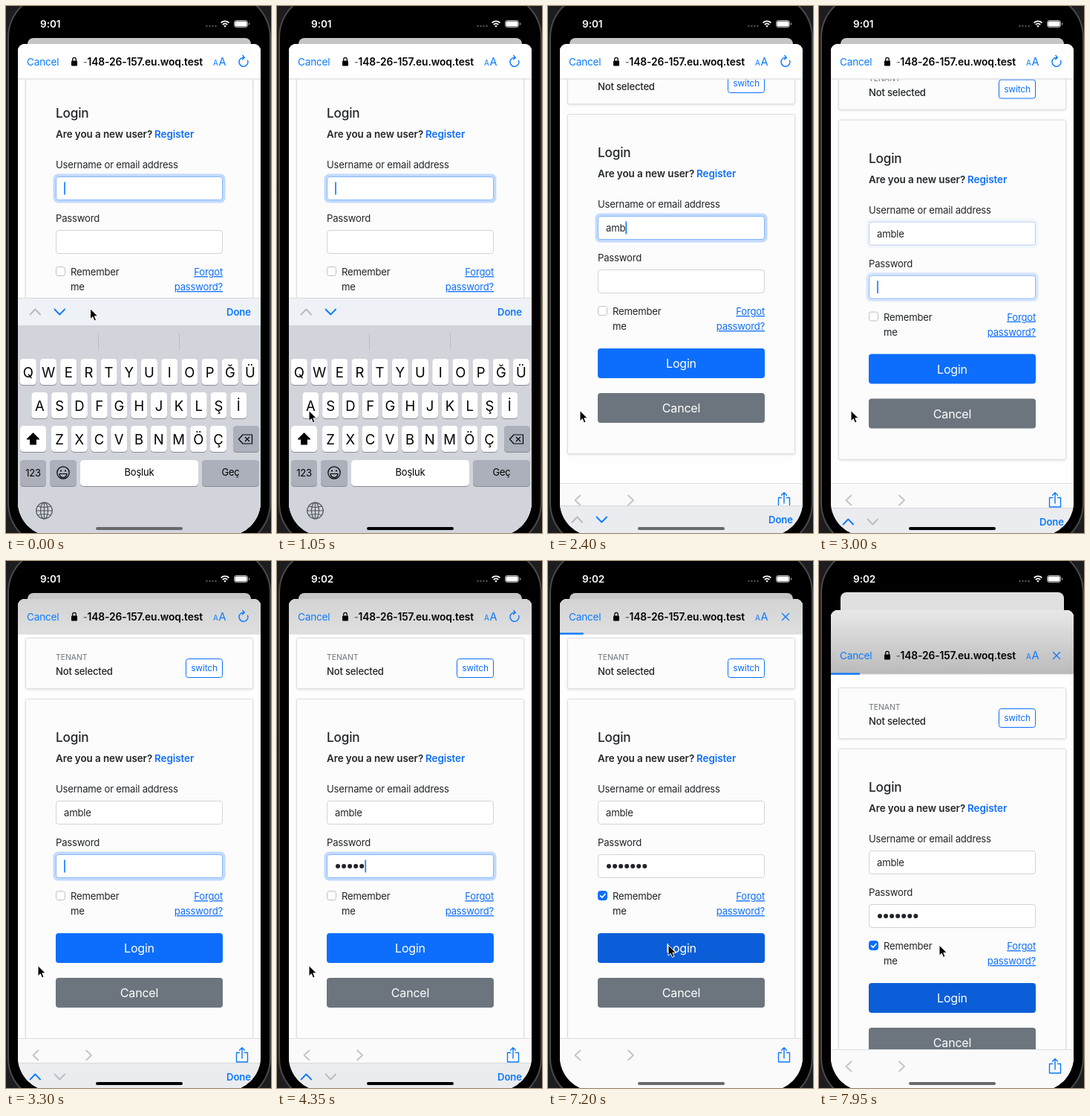
An HTML page for the animation above (8 s loop, 357 px wide and 708 px high).

```html
<!DOCTYPE html>
<html lang="en">
<head>
<meta charset="utf-8">
<title>Login on a phone</title>
<style>
  html, body { margin: 0; width: 100%; height: 100%; overflow: hidden; background: #000; }
  svg { display: block; width: 357px; height: 708px; }
  text { font-family: Inter, "Noto Sans", sans-serif; font-size: 13.1px; letter-spacing: -.2px; fill: #212529; white-space: pre; }
  .semi { font-weight: 600; font-size: 13.4px; letter-spacing: -.05px; }
  .mid { text-anchor: middle; }
  .end { text-anchor: end; }
  .blue { fill: #0d6efd; }
  .ios { fill: #0a7aff; }
  .key { font-size: 19px; letter-spacing: 0; fill: #000; }
  .small { font-size: 13px; fill: #000; }
  .card { filter: drop-shadow(0 1.5px 1.5px rgba(0, 0, 0, .12)); }
  .line { fill: none; stroke: #0a7aff; stroke-width: 1.4; stroke-linecap: round; stroke-linejoin: round; }
</style>
</head>
<body>
<svg id="stage" viewBox="0 0 357 708"></svg>
<script>
const LOOP = 8000, STEP = 150;
const USER = 'amble';
const DOT_PITCH = 8.05;
const stage = document.getElementById('stage');

const text = (x, y, s, cls = '', extra = '') => `<text x="${x}" y="${y}" class="${cls}" ${extra}>${s}</text>`;
const rect = (x, y, w, h, fill, extra = '') => `<rect x="${x}" y="${y}" width="${w}" height="${h}" fill="${fill}" ${extra}/>`;
const path = (d, extra = 'class="line"') => `<path d="${d}" ${extra}/>`;
const group = (id, body, extra = '') => `<g id="${id}" ${extra}>${body}</g>`;

const card = (y, h) => rect(26.5, y, 306, h, '#fcfcfc', 'class="card" rx="2" stroke="#dfdfdf"');

const field = (id, y) =>
  rect(65.5, y - 1.5, 228, 35, 'none', `id="${id}Ring" rx="4.5" stroke="#c2dafe" stroke-width="4"`) +
  rect(67.5, y + .5, 224, 31, '#fff', `id="${id}Box" rx="3.5"`);

const button = (id, y, fill, label) =>
  rect(67, y, 225, 40, fill, `id="${id}" rx="4"`) +
  text(179.5, y + 26, label, 'mid', 'style="font-size:16px;fill:#fff"');

function page() {
  return card(103.5, 68) +
    text(67, 133, 'TENANT', '', 'style="font-size:10.4px;fill:#6c757d;letter-spacing:0"') +
    text(67, 153, 'Not selected', '', 'font-weight="500"') +
    rect(242.5, 131.5, 49, 25, '#fff', 'rx="3" stroke="#0d6efd"') +
    text(267, 148, 'switch', 'mid blue', 'style="font-size:12px"') +
    card(185.5, 456) +
    text(67, 243, 'Login', '', 'style="font-size:17.2px" font-weight="500"') +
    text(67, 270, 'Are you a new user?', 'semi') +
    text(200, 270, 'Register', 'semi blue') +
    text(67, 311, 'Username or email address') + field('user', 322) +
    text(78, 343, '', '', 'id="userText"') +
    text(67, 383, 'Password') + field('pass', 394) + group('dots', '') +
    rect(0, 0, 1.6, 17, '#0a7aff', 'id="caret"') +
    rect(67.5, 443.5, 12, 12, '#fff', 'id="check" rx="3"') +
    path('M70.6 449.8l2.3 2.3 4-4.6', 'id="tick" fill="none" stroke="#fff" stroke-width="1.7" stroke-linecap="round"') +
    text(87, 455, 'Remember') + text(87, 475, 'me') +
    text(292, 455, 'Forgot', 'end blue', 'text-decoration="underline"') +
    text(292, 475, 'password?', 'end blue', 'text-decoration="underline"') +
    button('login', 500, '#0d6efd', 'Login') + button('cancel', 560, '#6c757d', 'Cancel');
}

function header() {
  return rect(16, 51, 327, 47, '#fff', 'id="headWhite"') +
    rect(16, 51, 327, 47, 'url(#shade)', 'id="headShade"') +
    rect(16, 97.5, 327, 1, '#d5d5d7', 'id="headLine"') +
    rect(16, 97, 0, 2.4, '#0a7aff', 'id="progress"') +
    group('headItems',
      text(28, 80, 'Cancel', 'ios', 'style="font-size:13.6px"') +
      rect(88, 73.5, 8, 7, '#000', 'rx="1.2"') +
      path('M89.7 74v-2a2.3 2.6 0 0 1 4.6 0v2', 'fill="none" stroke="#000" stroke-width="1.2"') +
      text(265, 80, '-148-26-157.eu.woq.test', 'semi end', 'style="fill:url(#fade);font-size:13.8px;letter-spacing:-.1px"') +
      text(279, 80, 'A', 'ios', 'style="font-size:10px"') +
      text(286.5, 80, 'A', 'ios', 'style="font-size:14.5px"') +
      path('M325.6 73.2a6 6 0 1 1-4.8-3.9M318.8 66.4l2.5 2.9-2.8 2.5', 'id="reload" class="line"') +
      path('M315.5 70.5l9 9M324.5 70.5l-9 9', 'id="stop" class="line"'));
}

const toolbar = () =>
  rect(16, 641, 327, 70, '#fafafa') + rect(16, 641, 327, .8, '#d8d8da') +
  path('M43.5 657.5l-7 6.5 7 6.5M108 657.5l7 6.5-7 6.5', 'class="line" style="stroke:#c3c3c7;stroke-width:1.8"') +
  path('M314.5 660.5h-4v12.5h15v-12.5h-4M318 668v-14M314.6 657.2l3.4-3.4 3.4 3.4');

function keyCap(x, y, w, dark, id = '') {
  return rect(x, y + 1, w, 35, '#898c92', 'rx="4.5"') +
    rect(x, y, w, 35, dark ? '#abb0ba' : '#fff', `rx="4.5" ${id}`);
}

const letterRows = [
  { keys: 'QWERTYUIOPĞÜ', x: 29.8, pitch: 27.2, y: 474 },
  { keys: 'ASDFGHJKLŞİ', x: 45.3, pitch: 26.8, y: 519 },
  { keys: 'ZXCVBNMÖÇ', x: 72, pitch: 26.75, y: 564 }
];

function keyboard() {
  const caps = letterRows.map(row => [...row.keys].map((k, i) =>
    keyCap(row.x + i * row.pitch - 11, row.y, 22)).join('')).join('');
  const letters = letterRows.map(row => [...row.keys].map((k, i) =>
    text(row.x + i * row.pitch, row.y + 25, k, 'mid key letter')).join('')).join('');
  return rect(16, 429, 327, 285, '#d1d4db') +
    rect(124, 440, 1, 22, '#b9bdc5') + rect(233, 440, 1, 22, '#b9bdc5') +
    group('hints', ['“a”', 'Abi', 'Akşam'].map((s, i) => text(70.5 + 109 * i, 456, s, 'mid small')).join('')) +
    caps + group('letters', letters) +
    keyCap(19, 564, 35, true, 'id="shiftCap"') +
    path('M36.5 574l8 8h-4.2v7h-7.6v-7h-4.2z', 'id="shift" stroke="#000" stroke-width="1.2" stroke-linejoin="round"') +
    keyCap(306, 564, 35, true) +
    path('M319 576h12.5v12H319l-5.5-6zM322 579l6 6M328 579l-6 6', 'fill="none" stroke="#000" stroke-width="1.2" stroke-linejoin="round"') +
    keyCap(19, 610, 35, true) + text(36.5, 632, '123', 'mid small') +
    keyCap(59, 610, 36, true) +
    '<g fill="none" stroke="#000" stroke-width="1.2"><circle cx="77" cy="627" r="8.2"/><path d="M72 628.5h10a5 5 0 0 1-10 0z"/></g>' +
    '<circle cx="74" cy="624.5" r="1.1"/><circle cx="80" cy="624.5" r="1.1"/>' +
    keyCap(100, 610, 159) + text(179.5, 631, 'Boşluk', 'mid small') +
    keyCap(264, 610, 77, true) + text(302.5, 631, 'Geç', 'mid small') +
    '<g fill="none" stroke="#50555c" stroke-width="1.2"><circle cx="51.5" cy="678" r="10.8"/><ellipse cx="51.5" cy="678" rx="5" ry="10.8"/>' +
    '<path d="M40.7 678h21.6M51.5 667v22M43 672q8.5 3 17 0M43 684q8.5-3 17 0"/></g>';
}

const accessory = () =>
  rect(16, 392, 327, 37, '#eef0f3', 'id="barFill"') + rect(16, 392, 327, .8, '#d3d5d9') +
  path('M32.5 414.5l6.8-7 6.8 7', 'id="up" class="line" style="stroke-width:1.8"') +
  path('M65.5 407.5l6.8 7 6.8-7', 'id="down" class="line" style="stroke-width:1.8"') +
  text(330, 416, 'Done', 'ios semi end', 'style="font-size:13.1px"');

const statusBar = () =>
  text(46, 29, '9:01', 'semi', 'id="clock" style="fill:#fff;font-size:13.6px"') +
  [0, 1, 2, 3].map(i => `<circle cx="${270.5 + 4 * i}" cy="27" r="1.2" fill="#555"/>`).join('') +
  path('M289.6 22.6a7.8 7.8 0 0 1 10.8 0M291.8 25a4.7 4.7 0 0 1 6.4 0', 'fill="none" stroke="#fff" stroke-width="1.8"') +
  path('M293.2 26.8a2.6 2.6 0 0 1 3.6 0l-1.8 1.9z', 'fill="#fff"') +
  rect(307.5, 19.5, 18, 9, 'none', 'rx="2.6" stroke="#aaa"') + rect(308.4, 20.4, 16.2, 7.2, '#fff', 'rx="1.6"') +
  rect(327, 22.5, 1.3, 3, '#999', 'rx=".6"');

stage.innerHTML = `
  <defs>
    <clipPath id="screen"><rect x="16" y="-20" width="327" height="732" rx="46"/></clipPath>
    <clipPath id="sheetClip"><rect id="sheetRect" x="16" y="51" width="327" height="700" rx="9"/></clipPath>
    <linearGradient id="shade" x2="0" y2="1"><stop id="shadeTop"/><stop id="shadeEnd" offset="1"/></linearGradient>
    <linearGradient id="fade" gradientUnits="userSpaceOnUse" x1="104" x2="110"><stop stop-opacity=".15"/><stop offset="1"/></linearGradient>
  </defs>` +
  rect(0, 0, 357, 708, '#1d1d1f') +
  rect(3, -17, 353, 744, '#000', 'rx="60" stroke="#4a4a4d" stroke-width="2"') +
  statusBar() +
  group('screenLayer',
    rect(29, 43, 301, 60, '#c6c6c6', 'id="backCard" rx="8"') +
    group('sheet',
      rect(16, 40, 327, 700, '#fefefe') + group('page', page()) + header() +
      group('toolbar', toolbar()) + group('keys', keyboard() + accessory()),
      'clip-path="url(#sheetClip)"') +
    rect(121, 700, 117, 4, '#000', 'id="home" rx="2"'),
    'clip-path="url(#screen)"') +
  group('pointer', path('M0 0v14.2l3.3-3 2.2 5.2 2.5-1.1-2.2-5h4.5z', 'stroke="#fff" stroke-width="1"'));

const el = {};
stage.querySelectorAll('[id]').forEach(node => el[node.id] = node);
const letterNodes = [...stage.querySelectorAll('.letter')];

const set = (node, attrs) => { for (const k in attrs) node.setAttribute(k, attrs[k]); };
const show = (node, on) => node.setAttribute('visibility', on ? 'visible' : 'hidden');
const move = (node, x, y) => node.setAttribute('transform', `translate(${x} ${y})`);
const mix = (a, b, p) => a + (b - a) * p;
const gray = (a, b, p) => { const v = Math.round(mix(a, b, p)); return `rgb(${v},${v},${v})`; };
const countPassed = (times, t) => times.filter(x => t >= x).length;

// Linear interpolation through [time, value] pairs.
function track(keys, t) {
  const i = keys.findIndex(k => k[0] > t);
  if (i === 0) return keys[0][1];
  if (i < 0) return keys[keys.length - 1][1];
  const [a, b] = [keys[i - 1], keys[i]];
  return mix(a[1], b[1], (t - a[0]) / (b[0] - a[0]));
}

const scrollKeys = [[2100, -93], [2250, -58], [2400, -40], [2550, -34], [3000, -32.4], [3150, -11], [3300, 0]];
const barKeys = [[2100, 392], [2250, 590], [2400, 671], [2550, 674], [5850, 674], [6000, 692], [6150, 714]];
const pullKeys = [[7500, 0], [7650, .12], [7800, .47], [7950, 1]];
const pointerX = [[150, 113.5], [450, 100], [1050, 43], [5100, 43], [5700, 97.5], [6000, 97.5], [6150, 118], [6300, 143], [6450, 156], [6750, 162]];
const pointerY = [[150, 406.5], [450, 432], [1050, 543.5], [5100, 543.5], [5700, 448], [6000, 448], [6150, 489], [6300, 504], [6450, 511], [6750, 516]];
const typed = [1200, 2250, 2400, 2550, 2700];
const dotTimes = [3450, 3600, 3900, 4050, 4350, 4650, 4800];

function drawField(id, focus) {
  el[id + 'Ring'].setAttribute('opacity', focus);
  el[id + 'Box'].setAttribute('stroke', focus > 0 ? (focus < .5 ? '#b9cdf0' : '#86b7fe') : '#d0d4d9');
}

function drawForm(t) {
  const name = USER.slice(0, countPassed(typed, t));
  const dots = countPassed(dotTimes, t);
  const inPassword = t >= 2850;
  el.userText.textContent = name;
  el.dots.innerHTML = Array.from({ length: dots }, (_, i) =>
    `<circle cx="${82 + DOT_PITCH * i}" cy="410" r="3" fill="#212529"/>`).join('');
  const nameWidth = name ? el.userText.getComputedTextLength() : 0;
  set(el.caret, inPassword ? { x: 78.2 + DOT_PITCH * dots, y: 401.5 } : { x: 78.2 + nameWidth, y: 329.5 });
  show(el.caret, t < 6000);
  drawField('user', track([[2700, 1], [2850, .7], [3000, .2], [3150, 0]], t));
  drawField('pass', track([[2700, 0], [2850, .3], [3000, .6], [3150, 1], [5850, 1], [6000, .3], [6150, 0]], t));
  const checked = t >= 6000;
  set(el.check, { fill: checked ? '#0d6efd' : '#fff', stroke: checked ? '#0d6efd' : '#bfbfbf' });
  show(el.tick, checked);
  el.login.setAttribute('fill', t >= 6450 ? '#0b5ed7' : '#0d6efd');
}

function drawKeyboard(t) {
  const upper = t < 1200, bar = track(barKeys, t);
  move(el.keys, 0, bar - 392);
  move(el.letters, 0, upper ? 0 : -2);
  letterNodes.forEach(node => {
    const s = node.textContent;
    node.textContent = upper ? s.toLocaleUpperCase('tr') : s.toLocaleLowerCase('tr');
    node.style.fontSize = upper ? '18.5px' : '20px';
  });
  show(el.hints, !upper);
  el.shiftCap.setAttribute('fill', upper ? '#fff' : '#abb0ba');
  el.shift.setAttribute('fill', upper ? '#000' : 'none');
  el.barFill.setAttribute('fill', bar > 600 ? '#ebecef' : '#eef1f5');
  el.up.style.stroke = t >= 2850 ? '#0a7aff' : '#b5b8be';
  el.down.style.stroke = t >= 2850 ? '#b9bcc1' : '#0a7aff';
}

function drawSheet(t) {
  const pull = track(pullKeys, t);
  const top = 51 + 15 * pull, bottom = 98 + 54 * pull;
  el.sheetRect.setAttribute('y', top);
  move(el.page, 0, track(scrollKeys, t) + 67 * pull);
  move(el.headItems, 0, 52 * pull);
  move(el.toolbar, 0, 15 * pull);
  for (const node of [el.headWhite, el.headShade]) set(node, { y: top, height: bottom - top });
  el.headShade.setAttribute('opacity', track([[3000, 0], [3150, .6], [3300, 1]], t));
  el.shadeTop.setAttribute('stop-color', gray(211, 232, pull));
  el.shadeEnd.setAttribute('stop-color', gray(223, 186, pull));
  el.headLine.setAttribute('y', bottom - .5);
  set(el.progress, { y: bottom - 1.6, width: track([[6600, 0], [6750, 10], [7350, 39]], t) });
  show(el.reload, t < 6750);
  show(el.stop, t >= 6750);
  set(el.backCard, { y: 43 - pull, fill: gray(198, 224, pull) });
}

function render(time) {
  const t = Math.floor(time % LOOP / STEP) * STEP;
  drawForm(t);
  drawKeyboard(t);
  drawSheet(t);
  el.clock.textContent = t < 3750 ? '9:01' : '9:02';
  const dim = t < 300 || t === 2250 || t === 2400 || t >= 6300;
  el.home.setAttribute('fill', dim ? '#68696c' : '#000');
  move(el.pointer, track(pointerX, t), track(pointerY, t));
}

const start = performance.now();
function tick() {
  render(performance.now() - start);
  requestAnimationFrame(tick);
}
tick();
</script>
</body>
</html>
```
